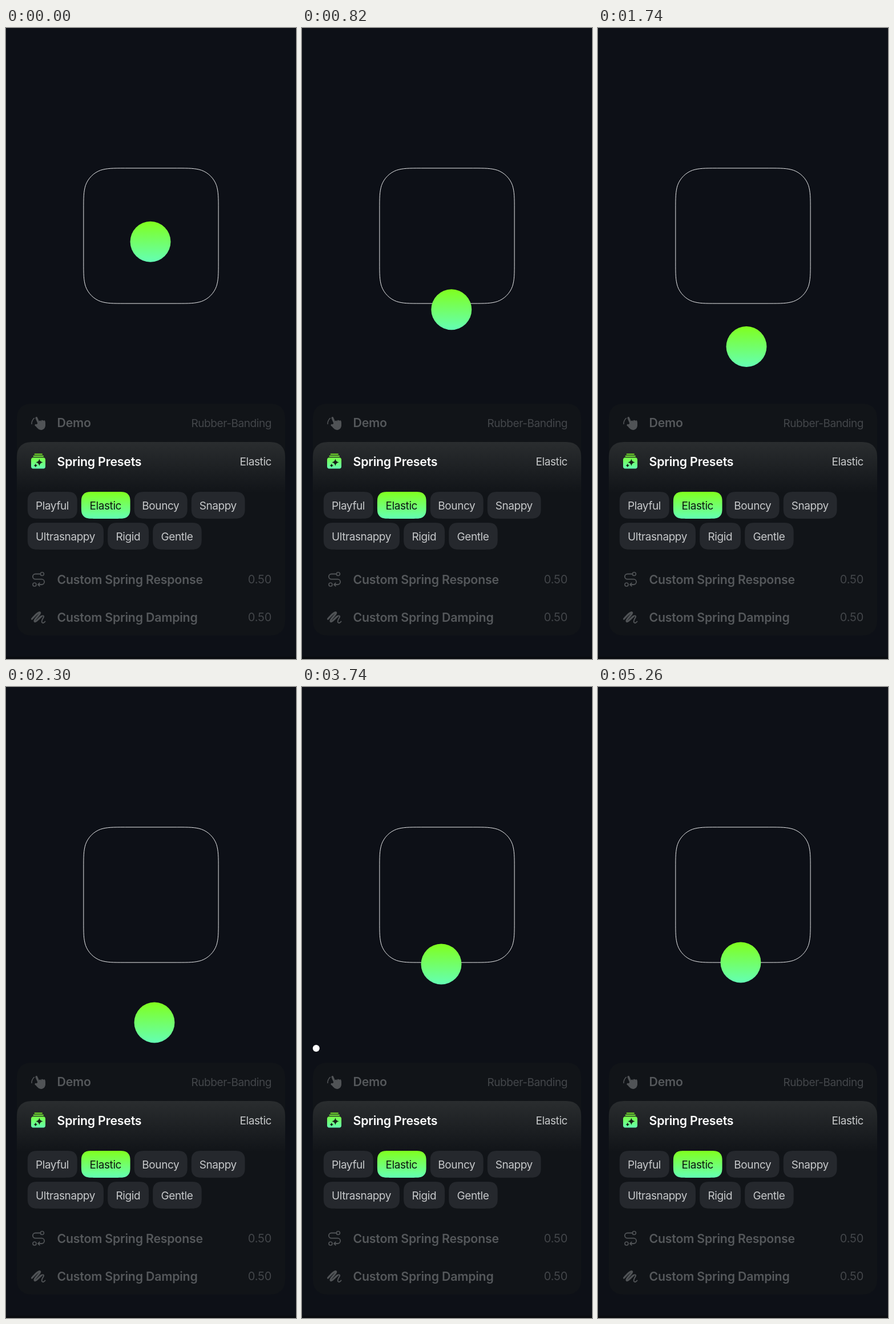
Animation, 508 px wide and 1102 px high, one loop 5.31 s. Source, as an HTML page with a canvas:

```html
<!DOCTYPE html>
<html lang="en">
<head>
<meta charset="utf-8">
<title>Spring Presets</title>
<style>
  html, body { margin: 0; width: 100%; height: 100%; overflow: hidden; background: #0d1017; }
  canvas, svg { position: absolute; left: 0; top: 0; width: 508px; height: 1102px; }
  text { font-family: Inter, "Liberation Sans", sans-serif; font-size: 19px; letter-spacing: -.42px; }
  .title { font-size: 21.3px; font-weight: 600; letter-spacing: -.2px; fill: #55585b; }
  .value { text-anchor: end; fill: #43464a; }
  .num { font-size: 20px; letter-spacing: -.1px; }
  .chip { text-anchor: middle; fill: #c6c8ca; }
  .title.on { fill: #fff; }
  .value.on { fill: #c6c8c9; }
  .chip.on { fill: #0d1710; }
</style>
</head>
<body>
<canvas id="stage" width="508" height="1102"></canvas>
<svg viewBox="0 0 508 1102">
  <text class="title" x="89.5" y="697">Demo</text>
  <text class="value" x="465" y="696.5">Rubber-Banding</text>
  <text class="title on" x="89.5" y="765">Spring Presets</text>
  <text class="value on" x="465" y="764">Elastic</text>
  <text class="chip" x="81" y="840.5">Playful</text>
  <text class="chip on" x="174.3" y="840.5">Elastic</text>
  <text class="chip" x="270.8" y="840.5">Bouncy</text>
  <text class="chip" x="371.3" y="840.5">Snappy</text>
  <text class="chip" x="104" y="894.5">Ultrasnappy</text>
  <text class="chip" x="213.8" y="894.5">Rigid</text>
  <text class="chip" x="299.5" y="894.5">Gentle</text>
  <text class="title" x="89.5" y="971">Custom Spring Response</text>
  <text class="value num" x="465.3" y="970">0.50</text>
  <text class="title" x="89.5" y="1037">Custom Spring Damping</text>
  <text class="value num" x="465.3" y="1036">0.50</text>
</svg>
<script>
const W = 508, H = 1102, LOOP = 5310, RELEASE = 3555;
const PT = W / 430; // the layout is 430 points wide
const RADIUS = 30 * PT;
const canvas = document.getElementById('stage');
const dpr = window.devicePixelRatio || 1;
canvas.width = W * dpr;
canvas.height = H * dpr;
const ctx = canvas.getContext('2d');
ctx.scale(dpr, dpr);
ctx.lineCap = ctx.lineJoin = 'round';

function vertical(y0, y1, from, to) {
  const g = ctx.createLinearGradient(0, y0, 0, y1);
  g.addColorStop(0, from);
  g.addColorStop(1, to);
  return g;
}
const green = (y0, y1) => vertical(y0, y1, '#80ff1e', '#64ffb4');

// Rounded rectangle with continuous-curvature corners.
function squircle(x, y, w, h, r) {
  const a = 1.52866 * r, b = 1.08849 * r, c = 0.86841 * r, d = 0.63149 * r;
  const e = 0.07491 * r, f = 0.37282 * r, g = 0.16906 * r;
  const p = new Path2D();
  const corner = (ox, oy, ux, uy, vx, vy) => {
    const at = (s, t) => [ox + ux * s + vx * t, oy + uy * s + vy * t];
    p.lineTo(...at(a, 0));
    p.bezierCurveTo(...at(b, 0), ...at(c, 0), ...at(d, e));
    p.bezierCurveTo(...at(f, g), ...at(g, f), ...at(e, d));
    p.bezierCurveTo(...at(0, c), ...at(0, b), ...at(0, a));
  };
  corner(x, y, 1, 0, 0, 1);
  corner(x, y + h, 0, -1, 1, 0);
  corner(x + w, y + h, -1, 0, 0, -1);
  corner(x + w, y, 0, 1, -1, 0);
  p.closePath();
  return p;
}

function stroke(d, width, color) {
  ctx.lineWidth = width;
  ctx.strokeStyle = color;
  ctx.stroke(typeof d === 'string' ? new Path2D(d) : d);
}
function fill(d, style) {
  ctx.fillStyle = style;
  ctx.fill(typeof d === 'string' ? new Path2D(d) : d);
}
function disc(x, y, r, style) {
  ctx.fillStyle = style;
  ctx.beginPath();
  ctx.arc(x, y, r, 0, Math.PI * 2);
  ctx.fill();
}
const star = (x, y, r) =>
  `M${x} ${y - r}Q${x + r * .15} ${y - r * .15} ${x + r} ${y}` +
  `Q${x + r * .15} ${y + r * .15} ${x} ${y + r}Q${x - r * .15} ${y + r * .15} ${x - r} ${y}` +
  `Q${x - r * .15} ${y - r * .15} ${x} ${y - r}Z`;

function drawIcons() {
  const gray = '#505356';
  // hand
  stroke('M45 691.5A13 13 0 0 1 49.3 681.5', 1.6, gray);
  stroke('M53.3 681L58.5 693M59.5 687.5L61 693M63.3 686.5L64 693M66.8 687L67.2 694M52.3 693.6L58.5 697', 3.7, gray);
  fill('M56 689C60 687 66 687 68.7 688C69.5 694 69.3 700 63.5 701.7C58 703 55 699 52 695.3Z', gray);
  // preset box
  const g = green(743, 770);
  stroke('M50.5 744.3H63', 1.8, g);
  stroke('M48.5 747.7H65', 1.9, g);
  fill(squircle(44, 750.3, 25, 19.2, 3.4), g);
  fill(star(58.4, 758.6, 6.3), '#172019');
  fill(star(51.8, 764, 3.6), '#172019');
  // route
  stroke('M60 953.5H51.5A4.5 4.5 0 0 0 51.5 962.7H62.5A4.6 4.6 0 0 1 62.5 972H56M58.8 969.3L56 972L58.8 974.7', 1.8, gray);
  stroke('M66.4 953.5A3 3 0 1 1 60.4 953.5A3 3 0 1 1 66.4 953.5M53 972A3 3 0 1 1 47 972A3 3 0 1 1 53 972', 1.7, gray);
  // scribble
  stroke('M45.5 1032C50 1027 57.5 1018.8 59.5 1020.8C61.5 1023 48 1033.5 50.3 1036.3C52 1038 58 1030.5 62 1027.5', 3.2, gray);
  stroke('M62 1027.5C64.5 1025.8 67 1026.5 65.8 1029C64.5 1031.5 61.5 1035.5 63 1038C64.5 1040 67 1038.5 68.5 1036.5', 2, gray);
}

const chipRows = [
  { y: 809.9, widths: [87, 85.7, 93, 93.8] },
  { y: 863.9, widths: [133.2, 72, 85.5] }
];

function drawChips() {
  const h = 47, gap = 6 * PT;
  for (const { y, widths } of chipRows) {
    let x = 32 * PT;
    for (const w of widths) {
      const active = w === chipRows[0].widths[1];
      fill(squircle(x, y, w, h, 12 * PT), active ? green(y, y + h) : '#25282d');
      x += w + gap;
    }
  }
}

function drawScene() {
  const left = 16 * PT, width = W - 2 * left, r = 20 * PT, side = 200 * PT;
  ctx.fillStyle = '#0d1017';
  ctx.fillRect(0, 0, W, H);
  ctx.fillStyle = '#0a0c10';
  ctx.fillRect(0, 1098, W, 4);
  fill(squircle(left, 656, width, 405, r), '#111418');
  fill(squircle(left, 723, width, 187, r), vertical(723, 812, '#2a2d2f', '#111418'));
  drawChips();
  drawIcons();
  stroke(squircle((W - side) / 2, 481.1 - side, side, side, 40 * PT), 0.95, '#f4f5f6');
}

// Drag path: time, x, y
const drag = [
  [0, 253, 373], [220, 257.5, 425], [440, 261, 464], [540, 262.5, 472],
  [1080, 260.6, 511], [1200, 260, 522.7], [1620, 260, 549], [2160, 260, 580.7],
  [2300, 260, 586], [2700, 259.5, 597.3], [3200, 258.6, 602], [3510, 258, 602.5],
  [RELEASE, 250, 602]
];

function slope(i, k) {
  const a = drag[Math.max(i - 1, 0)], b = drag[i], c = drag[Math.min(i + 1, drag.length - 1)];
  const l = a === b ? 0 : (b[k] - a[k]) / (b[0] - a[0]);
  const r = c === b ? 0 : (c[k] - b[k]) / (c[0] - b[0]);
  if (a === b) return r;
  if (c === b) return l;
  return l * r > 0 ? 2 * l * r / (l + r) : 0;
}

function dragAt(t, k) {
  let i = 0;
  while (i < drag.length - 2 && t > drag[i + 1][0]) i++;
  const a = drag[i], b = drag[i + 1], h = b[0] - a[0], s = (t - a[0]) / h;
  const s2 = s * s, s3 = s2 * s;
  return (2 * s3 - 3 * s2 + 1) * a[k] + (s3 - 2 * s2 + s) * h * slope(i, k) +
    (3 * s2 - 2 * s3) * b[k] + (s3 - s2) * h * slope(i + 1, k);
}

// Damped spring, response 0.5 s and damping 0.5.
function spring(t, offset, velocity) {
  const w = 2 * Math.PI / 0.5, z = 0.5, wd = w * Math.sqrt(1 - z * z);
  return Math.exp(-z * w * t) *
    (offset * Math.cos(wd * t) + (velocity + z * w * offset) / wd * Math.sin(wd * t));
}

function ballAt(t) {
  if (t < RELEASE) return [dragAt(t, 1), dragAt(t, 2)];
  const s = (t - RELEASE) / 1000;
  return [250 + spring(s, 0, -235), 481 + spring(s, 121, 0)];
}

const start = performance.now();

function frame(now) {
  const t = Math.max(0, now - start) % LOOP;
  drawScene();
  if (t >= RELEASE && t < 5260) disc(24.8, 631, 6, '#fff');
  const [x, y] = ballAt(t);
  disc(x, y, RADIUS, green(y - RADIUS, y + RADIUS));
  requestAnimationFrame(frame);
}
requestAnimationFrame(frame);
</script>
</body>
</html>
```
